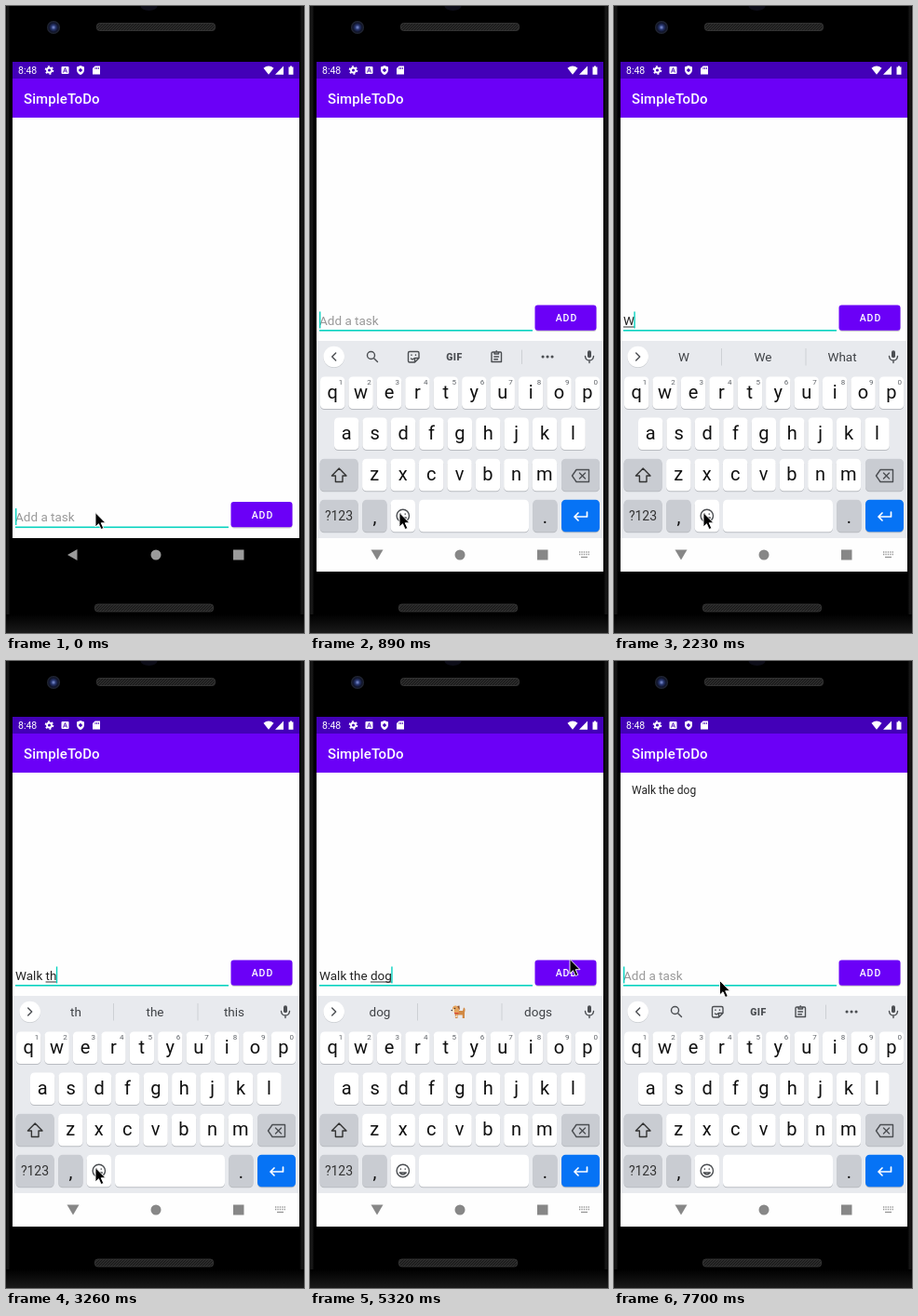
An HTML page for the animation above (8000 ms loop, 320x674 px).

```html
<!DOCTYPE html>
<html lang="en">
<head>
<meta charset="utf-8">
<title>To-do app demo</title>
<style>
html, body { margin: 0; width: 100%; height: 100%; overflow: hidden; background: #000; }
svg { display: block; width: 320px; height: 674px; font-family: Roboto, "Noto Sans", sans-serif; }
text { white-space: pre; }
.mid { text-anchor: middle; }
.title { font: 500 15px Roboto, sans-serif; letter-spacing: .1px; fill: #fff; }
.clock { font-size: 10.5px; fill: #fff; }
.entry { font-size: 13.5px; }
.item { font-size: 12px; fill: #222; }
.add { font: 500 10.5px Roboto, sans-serif; letter-spacing: .94px; fill: #fff; }
.letter { font-size: 20px; fill: #111; text-anchor: middle; }
.digit { font-size: 8px; fill: #5f6368; text-anchor: middle; }
.word { font-size: 13.5px; fill: #3f4246; text-anchor: middle; }
.line { fill: none; stroke: #4b4e52; stroke-width: 1.4; stroke-linecap: round; stroke-linejoin: round; }
</style>
</head>
<body>
<svg viewBox="0 0 320 674">
  <defs>
    <linearGradient id="edge">
      <stop offset="0" stop-color="#080808"/><stop offset=".006" stop-color="#1c1c1c"/>
      <stop offset=".014" stop-color="#000"/><stop offset=".985" stop-color="#000"/>
      <stop offset=".994" stop-color="#1a1a1a"/><stop offset="1" stop-color="#050505"/>
    </linearGradient>
    <linearGradient id="chin" x2="0" y2="1">
      <stop offset="0" stop-color="#000"/><stop offset="1" stop-color="#1a1a1a"/>
    </linearGradient>
    <radialGradient id="lens">
      <stop offset="0" stop-color="#8295d8"/><stop offset=".35" stop-color="#28366f"/>
      <stop offset=".7" stop-color="#10142a"/><stop offset="1" stop-color="#252a35"/>
    </radialGradient>
    <pattern id="mesh" width="3" height="3" patternUnits="userSpaceOnUse">
      <rect width="3" height="3" fill="#2b2b2b"/><path d="M0 3L3 0" stroke="#171717"/>
    </pattern>
    <clipPath id="screen"><rect x="7" y="60" width="308" height="548"/></clipPath>
  </defs>

  <!-- phone body -->
  <rect width="320" height="674" fill="url(#edge)"/>
  <rect y="654" width="320" height="20" fill="url(#chin)"/>
  <ellipse cx="153.500" cy="0" rx="9" ry="5" fill="#0d0d18"/>
  <circle cx="51" cy="23" r="7" fill="url(#lens)"/>
  <g fill="url(#mesh)" stroke="#3b3b3b" stroke-width=".8">
    <rect x="97.500" y="18.500" width="127" height="8" rx="3"/>
    <rect x="95.500" y="643" width="127" height="8" rx="3"/>
  </g>

  <g clip-path="url(#screen)">
    <rect x="7" y="60" width="308" height="512" fill="#fefefe"/>
    <rect x="7" y="60" width="308" height="18" fill="#4300b8"/>
    <rect x="7" y="78" width="308" height="42" fill="#6b00f7"/>

    <!-- status bar -->
    <text class="clock" x="13" y="73">8:48</text>
    <g fill="#fff">
      <circle cx="46.500" cy="69" r="2.500" fill="none" stroke="#fff" stroke-width="1.900"/>
      <circle cx="46.500" cy="69" r="4" fill="none" stroke="#fff" stroke-width="1.600" stroke-dasharray="2 2.190"/>
      <rect x="59.500" y="65" width="8" height="8" rx="1"/>
      <path d="M61.500 71.500L63.500 66.500L65.500 71.500M62.300 70H64.700" fill="none" stroke="#4300b8" stroke-width=".9"/>
      <path d="M80 64L84 65.600V69Q83.600 72.500 80 74Q76.400 72.500 76 69V65.600Z"/>
      <path d="M80 66.800L82.200 69L80 71.200L77.800 69Z" fill="#4300b8"/>
      <path d="M93 67L95.600 64.500H101V73.500H93Z"/>
      <path d="M96 66V68M97.700 66V68M99.400 66V68" stroke="#4300b8" stroke-width=".8"/>
      <path d="M276.500 66.800Q282 62.400 287.500 66.800L282 73.800Z"/>
      <path d="M289 73.800H298V64.500Z"/>
      <path d="M303.500 65.500H305V64.500H307V65.500H308.500V73.800H303.500Z"/>
    </g>
    <text class="title" x="19" y="105">SimpleToDo</text>
    <text class="item" id="item" x="19" y="142.700">Walk the dog</text>

    <!-- entry row -->
    <g id="row">
      <text class="entry" id="hint" x="10" y="554" fill="#999">Add a task</text>
      <text class="entry" id="entry" x="10" y="554" fill="#222"></text>
      <rect id="spell" y="556" height="1" fill="#333"/>
      <rect x="10" y="559.500" width="229" height="1.600" fill="#08d3c0"/>
      <rect id="caret" y="540" width="1.400" height="18" fill="#08d3c0"/>
      <rect x="242" y="534" width="65.500" height="27.500" rx="3" fill="#000" opacity=".18"/>
      <rect x="241.500" y="533" width="66" height="27.300" rx="3" fill="#6b00f7"/>
      <rect id="press" x="241.500" y="533" width="66" height="27.300" rx="3" fill="#fff"/>
      <text class="add" x="263.700" y="550.500">ADD</text>
    </g>

    <rect id="navBg" x="7" y="572" width="308" height="36"/>
    <g id="board">
      <rect x="7" y="360" width="308" height="260" fill="#e8eaee"/>
      <circle cx="25.700" cy="377.700" r="11.300" fill="#c9ccd0"/>
      <circle cx="25.700" cy="377" r="11.300" fill="#fff"/>
      <path class="line" id="chevron"/>
      <g id="tools" class="line">
        <circle cx="65.500" cy="375.500" r="4"/><path d="M68.700 378.700L72.500 382.500"/>
        <path d="M107 371.500H115.500Q117 371.500 117 373V378.500L112.500 383H107Q105.500 383 105.500 381.500V373Q105.500 371.500 107 371.500ZM112.500 383V378.500H117M108.500 379Q110 380.500 111.500 379M109 375V375.400M113.500 375V375.400"/>
        <text class="mid" x="155" y="381" font-size="10.500" font-weight="900" fill="#4b4e52" stroke="none" letter-spacing=".5">GIF</text>
        <path d="M196.500 372H204.500Q205.500 372 205.500 373V382.500H195V373Q195 372 196.500 372ZM198 372V374H202.500V372M197.800 377H202.500M197.800 379.700H201.500M200.200 370.700V371"/>
        <path d="M227.500 370V384.500" stroke="#cdd0d4" stroke-width="1"/>
        <path d="M250 377H250.100M255 377H255.100M260 377H260.100" stroke-width="3"/>
      </g>
      <g id="words">
        <path d="M115.500 368V386.500M206 368V386.500" stroke="#cdd0d4"/>
        <text class="word" x="75" y="382"></text>
        <text class="word" x="160" y="382"></text>
        <text class="word" x="245" y="382"></text>
        <g id="dog">
          <path d="M157 376H164L165 372.500Q167.500 373 166 378V384H163.700V380.500H158.500V384H156L155.500 376.500Z" fill="#d18a45"/>
          <path d="M153 374Q153 370 157 370.500L160.500 373L159.500 379H155.500Z" fill="#e5a35d"/>
          <path d="M153.200 374.500L151.800 376.500L155 377.500V374ZM157.500 379.500L156 383H158Z" fill="#f5e3c7"/>
          <path d="M158 371L160.500 370.500L160.800 375.500Z" fill="#8f512a"/>
          <circle cx="155.500" cy="373.500" r=".7" fill="#333"/><circle cx="152.300" cy="375.500" r=".8" fill="#333"/>
          <path d="M155 378.700H159.500" stroke="#d94035" stroke-width="1.200"/>
        </g>
      </g>
      <g class="line">
        <rect x="298" y="370.300" width="4" height="8" rx="2" fill="#4b4e52" stroke="none"/>
        <path d="M295.500 376.500Q296 381 300 381Q304 381 304.500 376.500M300 381V383.500"/>
      </g>
      <g id="keys"></g>
      <g class="line">
        <path id="shift" d="M31.200 497L39 505H35V511.500H27.400V505H23.400Z" stroke="#333"/>
        <path d="M286 498.500H299.500V511.500H286L281.500 505ZM289.500 502L295.500 508M295.500 502L289.500 508"/>
        <circle cx="99.800" cy="548" r="6.700"/>
        <path d="M96.300 550Q99.800 554 103.300 550ZM97.400 546V546.300M102.200 546V546.300"/>
        <path d="M297.500 544V549H284M288 545L284 549L288 553" stroke="#fff" stroke-width="1.700"/>
      </g>
    </g>
    <rect id="shade" x="7" y="572" width="308" height="36"/>
    <g id="nav">
      <path id="back"/>
      <circle cx="161" cy="590" r="5.500"/>
      <rect x="244" y="584.500" width="11.500" height="11"/>
    </g>
    <g id="switcher" fill="none" stroke-width="1.300">
      <path d="M289 587H300M289 589.500H300" stroke-dasharray="1.300 1.100"/>
      <path d="M291 592.500H298"/>
    </g>
  </g>
  <path id="mouse" d="M0 0V15.500L3.500 12.200L6.100 18L8.800 16.900L6.200 11.200H11Z" fill="#000" stroke="#fff" stroke-width=".9"/>
</svg>

<script>
const $ = id => document.getElementById(id);
const NS = "http://www.w3.org/2000/svg";
const LOOP = 8000;

function add(tag, attrs, text = "") {
  const el = document.createElementNS(NS, tag);
  for (const k in attrs) el.setAttribute(k, attrs[k]);
  el.textContent = text;
  return $("keys").appendChild(el);
}

function key(x, y, width, fill = "#fff") {
  const box = { x, width, height: 34.5, rx: 4.5 };
  add("rect", { ...box, y: y + 1, fill: "#b9bcc1" });
  add("rect", { ...box, y, fill });
}

const GREY = "#c9ccd2";
const STEP = 30.42;
const letters = [];
[["qwertyuiop", 24.2, 398.5], ["asdfghjkl", 39.2, 442.5], ["zxcvbnm", 69.3, 486.7]].forEach(([chars, left, y], r) => {
  [...chars].forEach((c, i) => {
    const x = left + i * STEP;
    key(x - 13.2, y, 26.4);
    letters.push(add("text", { class: "letter", x, y: y + 23.3 }, c));
    if (!r) add("text", { class: "digit", x: x + 8.8, y: 407 }, (i + 1) % 10);
  });
});
key(10.6, 486.7, 41, GREY);
key(270, 486.7, 41, GREY);
key(10.6, 530.8, 41, GREY);
key(56.3, 530.8, 26.2, GREY);
key(86.6, 530.8, 26.4);
key(117, 530.8, 118);
key(239.3, 530.8, 26.2, GREY);
key(270, 530.8, 41, "#0673f5");
add("text", { class: "mid", x: 31, y: 553, "font-size": 14, fill: "#333" }, "?123");
add("text", { class: "letter", x: 69.5, y: 556 }, ",");
add("text", { class: "letter", x: 252.400, y: 556 }, ".");

// Each step patches the state from its time on.
const start = { text: "", mark: 0, caret: 1, words: "", caps: 0, kb: 0, nav: 0, item: 0, press: 0, mouse: [96, 544.500] };
const steps = [
  [450, { caret: 0, nav: 1 }],
  [740, { kb: 1, nav: 2 }],
  [890, { kb: 2, nav: 3, caret: 1 }],
  [1330, { caret: 0 }],
  [1780, { caret: 1, caps: 1 }],
  [1930, { text: "W" }],
  [2080, { caps: 0, mark: 1 }],
  [2230, { words: "W We What" }],
  [2380, { text: "Wa", words: "Wa Was Want" }],
  [2670, { text: "Wal", words: "Wal Walk Wall" }],
  [2820, { text: "Walk", words: "Walk Walking Walked" }],
  [2970, { text: "Walk ", words: "the to in" }],
  [3110, { text: "Walk t", words: "t the to" }],
  [3260, { text: "Walk th", words: "th the this" }],
  [3410, { text: "Walk the", words: "the they them" }],
  [3550, { text: "Walk the ", words: "dog same first" }],
  [3700, { text: "Walk the d", words: "d dog day" }],
  [3850, { text: "Walk the do", words: "do dog door" }],
  [4000, { text: "Walk the dog", mark: 0 }],
  [4300, { mark: 1, words: "dog * dogs" }],
  [4740, { caret: 0 }],
  [4890, { mouse: [125, 510] }],
  [5030, { mouse: [205, 410], caret: 1 }],
  [5180, { mouse: [264, 336] }],
  [5320, { mouse: [279, 320.500] }],
  [5470, { caret: 0 }],
  [5620, { press: .2 }],
  [5770, { text: "", item: .35, caret: 1, press: .25 }],
  [5920, { item: 1, words: "", press: .12 }],
  [6070, { press: 0, mouse: [245, 326] }],
  [6210, { mouse: [158, 341] }],
  [6360, { mouse: [113.500, 343.500], caret: 0 }],
  [6800, { caret: 1 }],
  [7250, { caret: 0 }],
  [7700, { caret: 1 }]
];

const set = (id, attrs) => { for (const k in attrs) $(id).setAttribute(k, attrs[k]); };
const show = (id, on) => set(id, { visibility: on ? "visible" : "hidden" });
const slots = document.querySelectorAll("#words .word");

function draw(s) {
  const entry = $("entry");
  const width = text => {
    entry.textContent = text;
    return text ? entry.getComputedTextLength() : 0;
  };
  const from = width(s.text.slice(0, s.text.lastIndexOf(" ") + 1));
  const end = width(s.text);
  set("spell", { x: 10 + from, width: s.mark ? Math.max(0, end - from) : 0 });
  set("caret", { x: 10 + end - (end ? .6 : 0), opacity: s.caret });
  show("hint", !s.text);
  set("row", { transform: `translate(0 ${s.kb ? -211.5 : 0})` });
  set("press", { opacity: s.press });
  set("item", { opacity: s.item });

  show("board", s.kb);
  set("board", { transform: `translate(0 ${s.kb === 1 ? 56 : 0})` });
  for (const el of letters) {
    el.textContent = s.caps ? el.textContent.toUpperCase() : el.textContent.toLowerCase();
  }
  set("shift", { fill: s.caps ? "#333" : "none" });
  set("chevron", { d: s.words ? "M23.700 373L27.700 377L23.700 381" : "M27.700 373L23.700 377L27.700 381" });
  set("tools", { display: s.words ? "none" : "inline" });
  set("words", { display: s.words ? "inline" : "none" });
  const list = s.words.split(" ");
  slots.forEach((el, i) => { el.textContent = (list[i] || "").replace("*", ""); });
  set("dog", { display: list[1] === "*" ? "inline" : "none" });

  set("shade", { fill: s.kb === 2 ? "#fefefe" : "#000", opacity: [0, .18, 1][s.kb] });
  set("nav", { fill: ["#9b9b9b", "#9b9b9b", "#929396", "#878787"][s.nav] });
  set("back", { d: s.nav === 3 ? "M65.500 584.500H78.500L72 595.500Z" : "M66 590L76.500 584V596Z" });
  show("switcher", s.nav);
  set("switcher", { stroke: ["none", "#777", "#5d93c8", "#969696"][s.nav] });
  set("mouse", { transform: `translate(${s.mouse})` });
}

let shown = -1;
function tick(now) {
  const t = now % LOOP;
  const count = steps.filter(([at]) => at <= t).length;
  if (count !== shown) {
    shown = count;
    draw(Object.assign({}, start, ...steps.slice(0, count).map(step => step[1])));
  }
  requestAnimationFrame(tick);
}
tick(performance.now());
</script>
</body>
</html>
```
